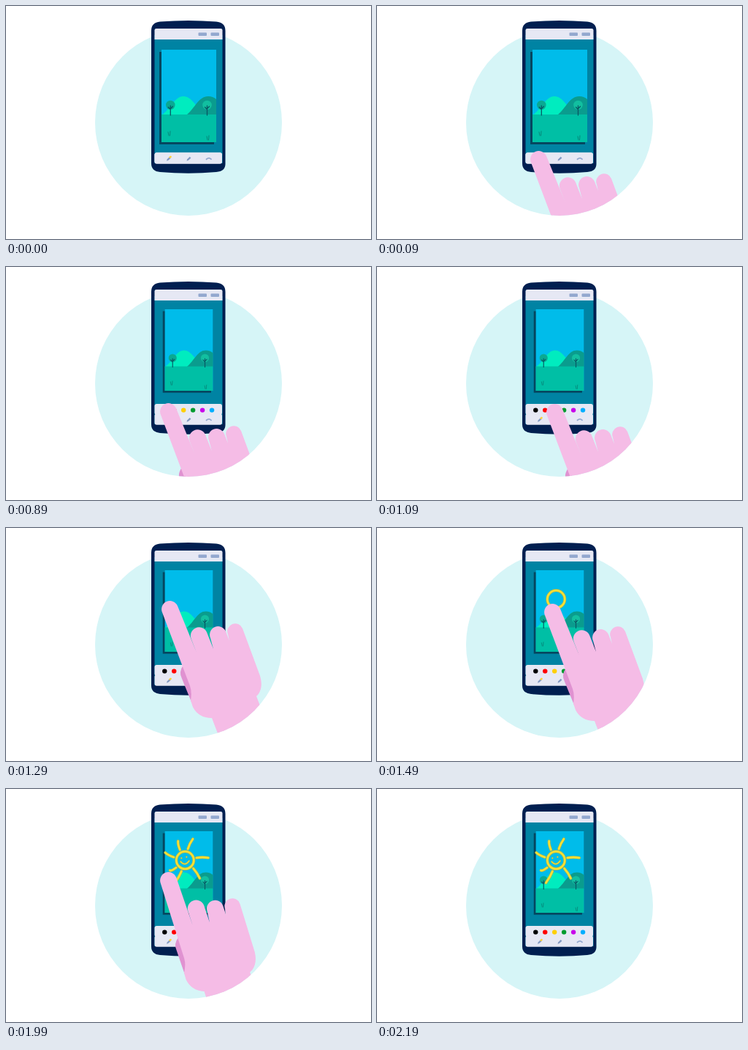
Recreate the animation shown at these times as an HTML page. Size 500 by 320 pixels, loop 3190 ms.

```html
<!DOCTYPE html>
<html lang="en">
<head>
<meta charset="utf-8">
<title>Drawing on a phone</title>
<style>
  html, body { margin: 0; width: 100%; height: 100%; overflow: hidden; background: #fff; }
  svg { display: block; width: 100%; height: 100%; }
  .line { fill: none; stroke-linecap: round; stroke-linejoin: round; }
</style>
</head>
<body>
<svg viewBox="0 0 500 320">
  <defs>
    <clipPath id="disc"><circle cx="250" cy="160" r="128"/></clipPath>
    <clipPath id="frame"><rect width="75" height="127"/></clipPath>
    <g id="tree">
      <circle r="6.3"/>
      <path class="line" d="M0 1V14M0 6l-3-3M0 5l3-3" stroke="#075864" stroke-width="1.3"/>
    </g>
    <path id="tuft" class="line" d="M-1.5-2l1 5M1.5-3l-.5 6" stroke="#08796f" stroke-width=".8"/>
    <path id="pencil" d="M-3 3L-2.300 .8L1.200-2.700L2.900-1L-.8 2.300Z"/>
  </defs>

  <circle cx="250" cy="160" r="128" fill="#d6f5f7"/>

  <!-- phone -->
  <path fill="#011f50" d="M199 34Q199 22.500 211 21.500Q250 18.500 288 21.500Q300.500 22.500 300.500 34V217Q300.500 227 288 228Q250 231.500 211 228Q199 227 199 216Z"/>
  <rect x="203.5" y="40" width="93" height="176" fill="#0083a3"/>
  <path fill="#e6e8f4" d="M203.500 46V33Q203.500 31 206 31H294Q296.500 31 296.500 33V46Z"/>
  <g fill="#93a8cf">
    <rect x="263.5" y="36.5" width="11.5" height="4.4" rx="1"/>
    <rect x="280.5" y="36.5" width="11.5" height="4.4" rx="1"/>
  </g>

  <!-- picture -->
  <g id="picture">
    <rect x="-3" y="3" width="75" height="127" fill="#05465f"/>
    <g clip-path="url(#frame)">
      <rect width="75" height="127" fill="#00bcea"/>
      <path fill="#00ecbf" d="M0 90C12 82 18 64 30 64C41 64 47 78 60 90Z"/>
      <path fill="#0a9c8e" d="M34 90C46 80 51 64 64 64Q71 64 76 69V90Z"/>
      <rect y="89" width="75" height="38" fill="#00bfa5"/>
      <use href="#tree" x="12.3" y="76" fill="#0aa992"/>
      <use href="#tree" x="62.5" y="76" fill="#12bfa0"/>
      <use href="#tuft" x="10.5" y="115"/>
      <use href="#tuft" x="63.5" y="121"/>
    </g>
  </g>
  <g id="sun" class="line" transform="translate(245.300 97.800)"></g>

  <!-- palette and toolbar -->
  <g id="palette">
    <rect x="203.5" y="188" width="92.5" height="15" rx="3" fill="#e6e8f4"/>
  </g>
  <rect x="203.5" y="201.5" width="92.5" height="15.3" rx="3" fill="#e6e8f4"/>
  <g fill="#8299c3">
    <use href="#pencil" x="223" y="209.7"/>
    <use href="#pencil" x="250.5" y="209.7"/>
    <path class="line" d="M274.500 210.500Q278 207.300 281 210.300" stroke="#93a8cf" stroke-width="1.8"/>
  </g>
  <path class="line" d="M224.600 207.800l1-.8" stroke="#ffd23c" stroke-width="2.4"/>

  <!-- hand, with the fingertip at 224,112 -->
  <g clip-path="url(#disc)">
    <g id="hand">
      <path fill="#e092d1" d="M243 188Q236 198 241 207L254 239L262 232Z"/>
      <path fill="#f5bce6" d="M214 116A11 11 0 0 1 235 107L261 171L254 153A11 11 0 0 1 275 143L284 166L280 151A11 11 0 0 1 301 142L306 155L304 146A10.500 10.500 0 0 1 324 138L348 203Q351 213 349 221Q347 228 343 231L385 340H312L282 261Q264 261 256 246L253 237Q255 225 252 217Z"/>
    </g>
  </g>
</svg>
<script>
const LOOP = 3190;
const $ = id => document.getElementById(id);
const clamp = v => Math.min(1, Math.max(0, v));

function add(parent, tag, attrs) {
  const node = document.createElementNS('http://www.w3.org/2000/svg', tag);
  for (const key in attrs) node.setAttribute(key, attrs[key]);
  parent.append(node);
  return node;
}

const swatches = ['#000', '#f00', '#ffcf00', '#009b2e', '#c800ea', '#00aeff'];
swatches.forEach((fill, i) => add($('palette'), 'circle', { cx: 217.3 + 12.95 * i, cy: 196.6, r: 3.2, fill }));

// A crayon line: a soft dark edge under a bright core
function crayon(d, width) {
  const group = add($('sun'), 'g', {});
  add(group, 'path', { d, pathLength: 1, stroke: '#a9b854', 'stroke-width': width + 1.4 });
  add(group, 'path', { d, pathLength: 1, stroke: '#f5e136', 'stroke-width': width });
  return group;
}

function polar(degrees, radius) {
  const a = degrees * Math.PI / 180;
  return `${radius * Math.cos(a)} ${radius * Math.sin(a)}`;
}

const disc = crayon('M0-12A12 12 0 0 1 0 12A12 12 0 0 1 0-12', 2.6);
const face = crayon('M-5-3v.2M2-4.500v.2M-6 2Q0 9 5.500 1', 1.1);
const rays = [[146, 25], [201, 29], [250, 28], [290, 31], [354, 32], [51, 32], [114, 34]]
  .map(([angle, length]) =>
    crayon(`M${polar(angle - 6, 16)}Q${polar(angle - 5, 24)} ${polar(angle, length)}`, 2.6));

// Fingertip path: time, x, y, turn in degrees
const path = [
  [0, 230, 310], [90, 221, 211], [590, 221, 211], [890, 222, 199], [1090, 243, 200],
  [1290, 224, 112], [1390, 252, 101], [1490, 240, 116], [1690, 238, 91],
  [1790, 270, 104], [1990, 222, 126, 3.2], [2190, 240, 325]
];

function handAt(t) {
  const next = path.findIndex(key => key[0] > t);
  if (next < 0) return [240, 325, 0];
  const [t0, x0, y0, turn0 = 0] = path[next - 1];
  const [t1, x1, y1, turn1 = 0] = path[next];
  const p = (t - t0) / (t1 - t0);
  const mix = (a, b) => a + (b - a) * p;
  return [mix(x0, x1), mix(y0, y1), mix(turn0, turn1)];
}

// The picture moves in steps: a quick entrance, a pause, then ten per second
function stepTime(t) {
  if (t < 90) return Math.floor(t / 30) * 30;
  if (t < 590) return 90;
  return 90 + Math.floor((t - 90) / 100) * 100;
}

const show = (node, visible) => { node.style.display = visible ? '' : 'none'; };

function draw(t) {
  const [x, y, turn] = handAt(t);
  $('hand').setAttribute('transform', `translate(${x} ${y}) rotate(${turn}) translate(-224 -112)`);

  const open = 1 - (1 - clamp((t - 490) / 300)) ** 2.6;
  $('palette').setAttribute('transform', `translate(0 ${13.2 * (1 - open)})`);
  $('picture').setAttribute('transform',
    `translate(${213 + 4.4 * open} ${60 - 2 * open}) scale(${1 - 0.118 * open})`);

  show(disc, t > 1290);
  disc.setAttribute('stroke-dasharray', `${clamp((t - 1290) / 200)} 2`);
  show(face, t >= 1790);
  rays.forEach((ray, i) => show(ray, t >= 1590 + 100 * Math.floor(i / 2)));
}

const begin = performance.now();
function tick() {
  draw(stepTime((performance.now() - begin) % LOOP));
  requestAnimationFrame(tick);
}
tick();
</script>
</body>
</html>
```
